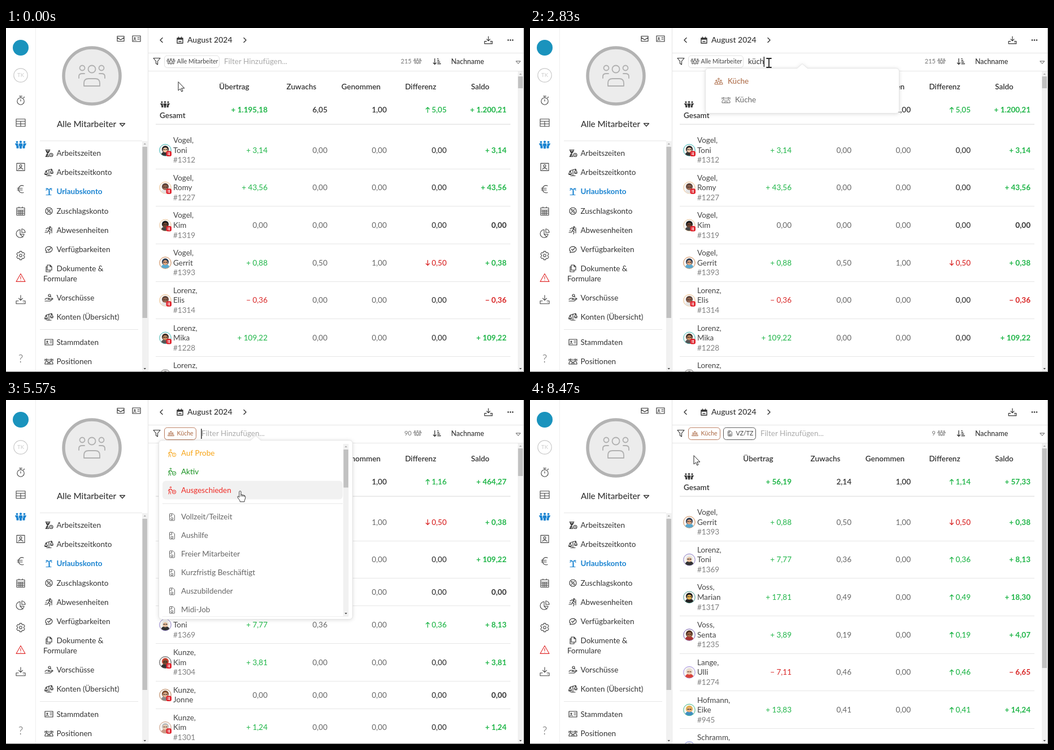
Animation of 917 by 611 pixels, one loop 9830 ms. Source, as an HTML page:

```html
<!DOCTYPE html>
<html lang="de">
<head>
<meta charset="utf-8">
<title>Urlaubskonto</title>
<style>
html, body { margin: 0; height: 100%; overflow: hidden; background: #fff }
svg { display: block; width: 100%; height: 100%; font-family: Lato, "Open Sans", sans-serif }
path { stroke-linecap: round; stroke-linejoin: round }
.drop { filter: drop-shadow(0 1px 3px #0002) }
</style>
</head>
<body>
<svg id="stage" viewBox="0 0 917 611"></svg>
<script>
const LOOP = 9830, INK = '#333', BLUE = '#1b84d1', GREEN = '#1eb547', RED = '#d92626', BROWN = '#a9653f';

const dot = (x, y, r) => `M${x - r} ${y}a${r} ${r} 0 1 0 ${2 * r} 0a${r} ${r} 0 1 0 ${-2 * r} 0`;
const ICON = {
  watch: dot(0, 1, 6.2) + 'M0-8v3M-2.5-8h5M0-2v3M5-5l1.5-1.5',
  table: 'M-8-6.5h16v13h-16zM-8-2.5h16M-8 2h16M0-2.5v9',
  people: dot(-6.5, -5, 1.4) + dot(0, -5.3, 1.6) + dot(6.5, -5, 1.4) +
    'M-2.5-2h5l.5 3-1.500 1.500v3.500h-3v-3.500l-1.500-1.500zM-9.500-2h4.500v3.500l1 1v3h-3v-3zM9.500-2h-4.500v3.500l-1 1v3h3v-3z',
  contact: 'M-7-6.5h14v13h-14zM-4 4q4-4.5 8 0' + dot(0, -2, 2),
  euro: 'M5-6a6.5 6.5 0 1 0 0 12M-6-1.5h9M-6 1.5h9',
  month: 'M-7-6h14v13h-14zM-7-2h14M-7 1h14M-7 4h14M-3-2v9M0-2v9M3-2v9M-3-8v2M3-8v2',
  pie: 'M-1-6.5a7 7 0 1 0 7 8h-7zM2-8v6.5h6a6.5 6.5 0 0 0-6-6.5M-1 1.5l5 5',
  gear: 'M-1.7-7.5h3.4l.9 2.6 2.7-.5 1.8 2.8-1.9 2.6 1.9 2.6-1.8 2.8-2.7-.5-.9 2.6h-3.4l-.9-2.6-2.7.5-1.8-2.8 1.9-2.6-1.9-2.6 1.8-2.8 2.7.5z' + dot(0, 0, 2.3),
  warn: 'M0-7l8 14h-16zM0-2v4M0 4.4v.2',
  load: 'M0-8v9M-3.5-2.5l3.5 3.5 3.5-3.5M-4 2h-4v5h16v-5h-4M5 4.6h.2',
  mail: 'M-6-4.5h12v9h-12zM-6-2l6 4 6-4',
  card: 'M-7-5h14v10h-14zM-5 3q2-3 4 0M2-2h3M2 1h3' + dot(-3, -1, 1),
  date: 'M-5-4h10v9h-10zM-5-3h10M-5-2h10M-2.5-6v2M2.5-6v2M-2 2h4',
  prev: 'M2-4l-4 4 4 4', next: 'M-2-4l4 4-4 4', down: 'M-4.5-2.5h9l-4.5 5z',
  funnel: 'M-6-6h12l-4.5 5.5v6l-3-2v-4z',
  sort: 'M-4-5v10M-6.5 2.5l2.5 2.5 2.5-2.5M1-5h1M1-2h2.5M1 1h4M1 4h5.5',
  team: dot(0, -12, 6.5) + dot(-17, -14, 4.5) + dot(17, -14, 4.5) +
    'M-14 18v-5q0-8 8-8h12q8 0 8 8v5zM-23 4v-3q0-5 6-5h4M23 4v-3q0-5-6-5h-4',
  hour: 'M-6-6h8M-6 6h6M-5-6q0 4 3 6-3 2-3 6h4M1-6q0 4-3 6M-4-4h4l-2 3zM-4 5l2-3 1 3' + dot(4, 3, 3) + 'M4 1.5v2h1',
  scale: 'M-4 6h8M0 6v-11M-5-3l10-3M-5-3l-2.5 6h5zM5-5.5l-2.5 6h5zM-7 4h4M3 2h4',
  palm: 'M-5 6h9M0 6v-9M0-3q-4-3-5 1M0-3q4-3 5 1M0-3q-3-4-5-2M0-3q3-4 5-2M1 6v-8',
  percent: dot(0, 0, 6) + dot(-2, -2, .8) + dot(2, 2, .8) + 'M2.5-2.5l-5 5',
  run: dot(2, -5, 1.3) + 'M-5-2l3-2 3 1-2 4 3 2-1 4M-1 1l-2 3h-4M1-2l2 2h2M5 5v-9M-6 1h2',
  chat: 'M-5 6l.5-2.5a6 5 0 1 1 3 1.5zM-2.5 0l2 2 3.5-4',
  copy: 'M-3-6h5l3 3v6h-8zM-3-3h-2v9h7v-3M2-6v3h3',
  give: 'M-7 3l3-2h4l1 1-3 1h4l4-2 1 1-5 4h-9M2-2l2 1' + dot(1, -4, 2),
  post: dot(-4, -3, 1.3) + dot(4, -3, 1.3) + 'M-7 5v-2l2-3h2l3 3 3-3h2l2 3v2zM-7-4v3M7-4v3M-2 5v-2M2 5v-2M0-1v-3',
  kitchen: dot(0, -4, 1.4) + dot(-4, -1, 1.2) + dot(4, -1, 1.2) + 'M-7 5l1-3h4l2-3 2 3h4l1 3zM-2 5v-3M2 5v-3',
  file: 'M-3.5-6h5l3 3v8q0 1-1 1h-7q-1 0-1-1v-10q0-1 1-1M-4.500-2h4v-4M-2 4v-2l1.500-1.500 1 1.500 1-1v3z',
  walk: dot(-2.5, -5.3, 1.2) + 'M-6.500 1l1-3h4.500l1.500 2M-4.500-2l-.5 4-1 4.500M-1.500-2v2M-3.500 2l1 4.500' + dot(3.5, 2.8, 3.3),
  up: 'M0 4.5v-9M-3-1.5l3-3 3 3', fall: 'M0-4.5v9M-3 1.5l3 3 3-3',
  mark0: 'M3.5 1.3v1.700M3.500 4.500v.1', mark1: 'M2.1 2.900l1 1 1.800-2', mark2: 'M2.500 1.800l2 2M4.500 1.800l-2 2'
};
const icon = (n, x, y, c = INK, k = 1, w = 1.15, fill = 'none') =>
  `<path d="${ICON[n]}" transform="translate(${x} ${y}) scale(${k})" fill="${fill}" stroke="${c}" stroke-width="${w}"/>`;
const text = (x, y, s, c = INK, z = 13.5, w = 400, a = 'start') =>
  `<text x="${x}" y="${y + z * .35}" fill="${c}" font-size="${z}" font-weight="${w}" text-anchor="${a}">${s}</text>`;
const rect = (x, y, w, h, c, r = 0, s = 'none') =>
  `<rect x="${x}" y="${y}" width="${w}" height="${h}" rx="${r}" fill="${c}" stroke="${s}"/>`;
const circle = (x, y, r, c, s = 'none', w = 1) =>
  `<circle cx="${x}" cy="${y}" r="${r}" fill="${c}" stroke="${s}" stroke-width="${w}"/>`;
const hline = (x, x2, y, c = '#e6e6e6') => rect(x, y, x2 - x, 1, c);
const bar = (x, y, y2, a, b) => rect(x, y, 9.5, y2 - y, '#f1f1f1') + rect(x + .5, a, 8.5, b - a, '#c1c1c1') +
  `<path d="M${x + 2.5} ${y + 6}h4.5l-2.25-2.5z" fill="#aaa"/><path d="M${x + 2.5} ${y2 - 6}h4.5l-2.25 2.5z" fill="#444"/>`;

// table data: last name, first name, number, look (ring skin hair shirt), badge, carry, gain, taken, saldo
const pale = '#efc08a #96644e #5c4136 #e4e4e4', gerrit = ['Vogel', 'Gerrit', 1393, '#d08a55 #dca27d #27364d #5aa9d0', 0, .88, .5, 1],
  mika = ['Lorenz', 'Mika', 1228, '#3cb9b4 #c58a60 #3a2a22 #555', 1, 109.22],
  toni = ['Lorenz', 'Toni', 1369, '#8a7bc8 #e8bd9c #e8e8e8 #333', 0, 7.77, .36];
const TABLES = [
  { count: 215, thumb: 107, sum: [1195.18, 6.05, 1, 1200.21], rows: [
    ['Vogel', 'Toni', 1312, '#35b5b5 #f0c6a6 #1d1d1f #333', 1, 3.14],
    ['Vogel', 'Romy', 1227, pale, 1, 43.56],
    ['Vogel', 'Kim', 1319, '#eec79a #6d422e #1a1a1a #444', 1, 0],
    gerrit,
    ['Lorenz', 'Elis', 1314, pale, 1, -.36],
    mika,
    ['Lorenz', 'Romy', 1240, '#777 #80503c #222 #555', 1, 0]] },
  { count: 90, thumb: 135, sum: [463.11, 2.16, 1], rows: [
    gerrit, mika,
    ['Lorenz', 'Kim', 0, pale, 1, 0],
    toni,
    ['Kunze', 'Kim', 1304, '#444 #7a4a32 #c8412f #333', 1, 3.81],
    ['Kunze', 'Jonne', 0, '#b98055 #e3b190 #7a4b2c #888', 1, 0],
    ['Kunze', 'Kim', 1301, '#c99a80 #edc9ae #bbb #c98', 1, 1.24]] },
  { count: 9, thumb: 476, sum: [56.19, 2.14, 1], rows: [
    gerrit, toni,
    ['Voss', 'Marian', 1317, '#4b9a8d #e3b04f #17171a #222', 0, 17.81, .49],
    ['Voss', 'Senta', 1235, '#7a62b5 #a66a48 #4a2c20 #a33', 0, 3.89, .19, 0, 4.07],
    ['Lange', 'Ulli', 1274, '#a08be0 #f0cdb2 #e6e2da #d9433a', 0, -7.11, .46],
    ['Hofmann', 'Eike', 945, '#3cb98a #e9ad7c #e0b04a #3f8fc0', 0, 13.83, .41],
    ['Schramm', 'Kim', 1250, '#7a82d8 #e3b190 #999 #555', 0, 0]] }
];
const num = v => Math.abs(v).toFixed(2).replace('.', ',').replace(/(\d)(\d{3}),/, '$1.$2,');
const signed = v => (v > 0 ? '+ ' : v < 0 ? '− ' : '') + num(v);
const tone = (v, zero) => v > 0 ? GREEN : v < 0 ? RED : zero;

function values(y, [carry, gain = 0, taken = 0, saldo], bold) {
  const diff = +(gain - taken).toFixed(2), end = saldo ?? +(carry + diff).toFixed(2);
  const cell = (x, s, c, w) => text(x, y, s, c, 13.5, w, 'end');
  const w = bold ? 600 : 400, c = bold ? INK : '#666';
  return cell(463, signed(carry), tone(carry, c), bold ? 700 : 400) + cell(569, num(gain), c, w) + cell(674, num(taken), c, w) +
    cell(780, num(diff), tone(diff, INK), bold ? 600 : 500) + cell(886, signed(end), tone(end, INK), 700) +
    (diff ? icon(diff > 0 ? 'up' : 'fall', 746.5, y, tone(diff), 1, 1.3) : '');
}

function avatar(x, y, look, badge) {
  const [ring, skin, hair, shirt] = look.split(' ');
  return circle(x, y, 10.3, '#f7f5f3', ring) + circle(x, y - 1.8, 6, hair) +
    `<path d="M${x - 7} ${y + 7.5}a7 5 0 0 1 14 0q-7 5-14 0" fill="${shirt}"/>` + circle(x, y - .3, 4.4, skin) +
    `<path d="M${x - 3} ${y - 1}h2m2 0h2" stroke="#222" stroke-width="1.2"/>` +
    (badge ? rect(x + 1.5, y + 1.5, 9.5, 9.5, '#e0222c', 3) +
      `<path d="M${x + 4} ${y + 5}h4M${x + 4} ${y + 7.5}h4M${x + 7} ${y + 4}v5" stroke="#fff" stroke-width=".9"/>` : '');
}

function table({ count, thumb, sum, rows }) {
  let y = 183.6;
  return text(718, 59, count, '#777', 11, 400, 'end') + bar(906, 77, 610, 86, thumb) + values(145.5, sum, true) +
    rows.map(([last, first, id, look, badge, ...v]) => {
      const h = id ? 66.7 : 49, c = y + h / 2, top = c - (id ? 17.6 : 8.8);
      y += h;
      return text(296, top, last + ',', '#444') + text(296, top + 17.6, first, '#444') +
        (id ? text(296, top + 35.2, '#' + id, '#808080') : '') +
        avatar(282, c, look, badge) + values(c, v) + hline(265, 893, Math.floor(y - .3));
    }).join('');
}

// filter menu
const STATUS = [['Auf Probe', '#f7a416'], ['Aktiv', '#16911f'], ['Ausgeschieden', '#f02a24']].map(([s, c], i) => [s, 'walk', c, 'mark' + i]);
const KINDS = ['Vollzeit/Teilzeit', 'Aushilfe', 'Freier Mitarbeiter', 'Kurzfristig Beschäftigt', 'Auszubildender', 'Midi-Job', 'Werkstudent']
  .map(s => [s, 'file', '#666']);
const KITCHEN = [['Küche', 'kitchen', BROWN], ['Küche', 'post', '#666', '', 13]];

function menu(x, state, typed, [cx, cy]) {
  const short = typed.length > 1;
  let items = [...STATUS, ...KINDS.slice(state > 1 ? 1 : 0)].slice(0, 9);
  if (typed) items = short ? KITCHEN : [...STATUS, ...KINDS, ...KITCHEN].filter(([s]) => /k/i.test(s));
  const h = short ? 80 : 318, l = x - 75.5, m = x + 96;
  return `<path class="drop" d="M${l + 6} 71.5H${m - 9}L${m} 63.5L${m + 9} 71.5H${l + 337}q6 0 6 6v${h - 12}q0 6-6 6H${l + 6}q-6 0-6-6v${12 - h}q0-6 6-6z" fill="#fff" stroke="#e4e4e4"/>` +
    items.map(([s, n, c, mark, dx = 0], i) => {
      const y = 94 + 33 * i + (!typed && i > 2 ? 14.5 : 0);
      const hot = cx > x - 69 && cx < x + 250 && Math.abs(cy - y) < 16.5;
      return (hot ? rect(x - 69, y - 16.5, 319, 33, '#f1f1f1', 6) : '') + icon(n, x - 52 + dx, y + .5, c, 1, 1) +
        (mark ? icon(mark, x - 52, y + .5, c, 1, 1) : '') + text(x - 36 + dx, y, s, c);
    }).join('') +
    (typed ? '' : hline(x - 69, x + 250, 183.5)) +
    (short ? '' : bar(x + 251, 78, 384, 88, typed ? 300 : 153 + 2.5 * state) + hline(x - 69, x + 260, 384, '#f0f0f0')) +
    (state > 1 ? rect(x + 95, 389, 10, 1.5, INK) : '');
}

// pointer path: time, x, y, easing toward that point
const io = u => u * u * (3 - 2 * u), out = u => 1 - (1 - u) ** 2, into = u => u ** 1.5, lin = u => u;
const PATH = [[0, 305, 96, lin], [270, 305, 96, lin], [970, 423, 62, io], [3370, 423, 62, lin], [3800, 419, 95, io], [4130, 419, 95, lin],
  [4170, 433, 84, lin], [4630, 499, 84, out], [5170, 499, 84, lin], [5570, 415, 162, into], [5930, 385, 204, out],
  [7330, 385, 204, lin], [7900, 290, 99, io], [LOOP, 290, 99, lin]];
function pointer(t) {
  const i = PATH.findIndex(p => p[0] > t), [t0, x0, y0] = PATH[i - 1], [t1, x1, y1, ease] = PATH[i];
  const u = ease((t - t0) / (t1 - t0));
  return [x0 + (x1 - x0) * u, y0 + (y1 - y0) * u];
}
const CURSOR = {
  arrow: ['M0 0v15l3.5-3 2.3 5 2.2-1-2.3-5h4.8z', '#fff', 1],
  beam: ['M-4-8h3l1 1 1-1h3M0-7v14M-4 8h3l1-1 1 1h3', 'none', 1.8],
  hand: ['M-2 10v-9a1.6 1.6 0 0 1 3.2 0v5l5.600 1.200q2.200.6 2.200 2.800c0 4-1.800 5-1.800 8.500h-7.700c0-3.500-3-4.500-4.500-8.500q0-2.500 3 0zM1.200 6v3M4 6.700v2.500M6.700 7.300v2.200', '#fff', .9]
};

const chip = (x, w, n, s, c, edge) => rect(x + .5, 49, w, 21.5, '#fff', 5, edge) + icon(n, x + 12, 59.5, c, .75, 1.2) + text(x + 22.5, 59.5, s, c, 10.6);

const CARET = [[1170, 1700], [2170, 3370], [4130, 4640], [5170, 5700], [6200, 6530], [6830, 7360], [7890, 8200]];
const KEYS = [2170, 2400, 2700, 2830];

function scene(t) {
  const state = t < 4130 ? 0 : t < 6830 ? 1 : 2, x = [386, 346, 408][state], at = pointer(t), [cx, cy] = at;
  const n = state ? 0 : KEYS.filter(k => t >= k).length, typed = 'küch'.slice(0, n);
  const shown = t < 1170 ? 0 : t < 1500 ? out((t - 1170) / 330) : t < 8200 ? 1 : Math.max(0, 1 - (t - 8200) / 270);
  const slide = t < 1500 ? (1 - shown) * 9 : 0;
  const over = shown && cx > x - 75 && cx < x + 267 && cy > 72 && cy < (n > 1 ? 151 : 389);
  const [d, fill, w] = CURSOR[over ? 'hand' : cx > x && cy > 48 && cy < 72 ? 'beam' : 'arrow'];
  return table(TABLES[state]) +
    (state ? chip(280, 56, 'kitchen', 'Küche', BROWN, '#b9795a') : chip(280, 97, 'people', 'Alle Mitarbeiter', '#444', '#e0e0e0')) +
    (state > 1 ? chip(342, 57, 'file', 'VZ/TZ', '#444', '#555') : '') +
    text(x, 59.5, typed || 'Filter Hinzufügen...', n ? INK : '#aaa') +
    (shown ? `<g opacity="${shown}" transform="translate(0 ${slide})">${menu(x, state, typed, at)}</g>` : '') +
    (CARET.some(([a, b]) => t >= a && t < b) ? rect(x - .7 + [0, 7, 14.6, 20.8, 28.4][n], 51, 1.3, 18, '#111') : '') +
    `<path d="${d}" transform="translate(${cx} ${cy})" fill="${fill}" stroke="#222" stroke-width="${w}"/>`;
}

// fixed parts
const NAV = ['watch', 'table', 'people', 'contact', 'euro', 'month', 'pie', 'gear', 'warn', 'load'];
const NAV_COLOR = { people: BLUE, warn: '#e02b2b' };
const MENU = [[222.5, 'hour', 'Arbeitszeiten'], [256.5, 'scale', 'Arbeitszeitkonto'], [290.5, 'palm', 'Urlaubskonto'], [325, 'percent', 'Zuschlagskonto'],
  [359, 'run', 'Abwesenheiten'], [393, 'chat', 'Verfügbarkeiten'], [427, 'copy', 'Dokumente &amp;'], [479, 'give', 'Vorschüsse'],
  [513, 'scale', 'Konten (Übersicht)'], [558, 'card', 'Stammdaten'], [592, 'post', 'Positionen']];
const HEADS = [[404, 'Übertrag'], [523, 'Zuwachs'], [628.5, 'Genommen'], [734, 'Differenz'], [839.5, 'Saldo']];

stage.innerHTML = rect(0, 0, 917, 611, '#fff') + rect(52, 0, 1, 611, '#efefef') + rect(251, 0, 1, 611, '#e4e4e4') +
  circle(26, 35, 14, '#1a93bd') + circle(26, 84, 12.2, '#fff', '#c8c8c8', 1.2) + text(26, 84, 'TK', '#ccc', 9.5, 400, 'middle') +
  NAV.map((n, i) => icon(n, 26, 129 + 39.3 * i, NAV_COLOR[n] || '#444', 1, 1.1, n == 'people' ? BLUE : 'none')).join('') +
  text(26, 587, '?', '#555', 19, 300, 'middle') +
  icon('mail', 203, 19) + icon('card', 231, 19) +
  circle(152, 85, 50, '#ececec', '#b3b3b3', 5.5) + icon('team', 152, 85, '#b0b0b0', 1, 1.8) +
  text(90, 171, 'Alle Mitarbeiter', INK, 15.2, 500) + icon('down', 206, 172, INK, 1, 1.3) +
  hline(60, 241, 200) + hline(60, 234, 535) + bar(241, 201, 610, 211, 515) +
  MENU.map(([y, n, s], i) => icon(n, 76, y, i == 2 ? BLUE : INK) + text(89.5, y, s, i == 2 ? BLUE : INK, 13.5, i == 2 ? 700 : 400)).join('') +
  text(66, 445, 'Formulare') +
  hline(252, 917, 44) + hline(252, 917, 76) +
  icon('prev', 275, 21.5, INK, 1, 1.4) + icon('date', 308, 22, INK, 1, 1.4) + text(321, 21.5, 'August 2024', INK, 14, 500) + icon('next', 423, 21.5, INK, 1, 1.4) +
  icon('load', 854, 22, INK, .85, 1.4) + [889, 893, 897].map(x => circle(x, 21.5, 1.3, INK)).join('') +
  icon('funnel', 267, 59.5) + icon('people', 728.5, 59, '#777', .7, 1.4) + icon('sort', 763, 59.5, INK, 1, 1.3) +
  text(788, 59.5, 'Nachname', INK, 12.4, 500) + icon('down', 907, 61, '#555', .85) +
  HEADS.map(([x, s]) => text(x, 104, s, INK, 13.5, 600, 'middle')).join('') +
  icon('people', 281.5, 136, INK, .85, .8, INK) + text(272, 155, 'Gesamt', INK, 13.5, 600) + hline(265, 893, 170.5, '#d8d8d8') +
  '<g id="live"></g>' + hline(0, 917, 610, '#777') + rect(916, 0, 1, 611, '#999');

const live = document.getElementById('live');
let last = '';
function tick() {
  const now = scene(performance.now() % LOOP);
  if (now !== last) live.innerHTML = last = now;
  requestAnimationFrame(tick);
}
tick();
</script>
</body>
</html>
```
